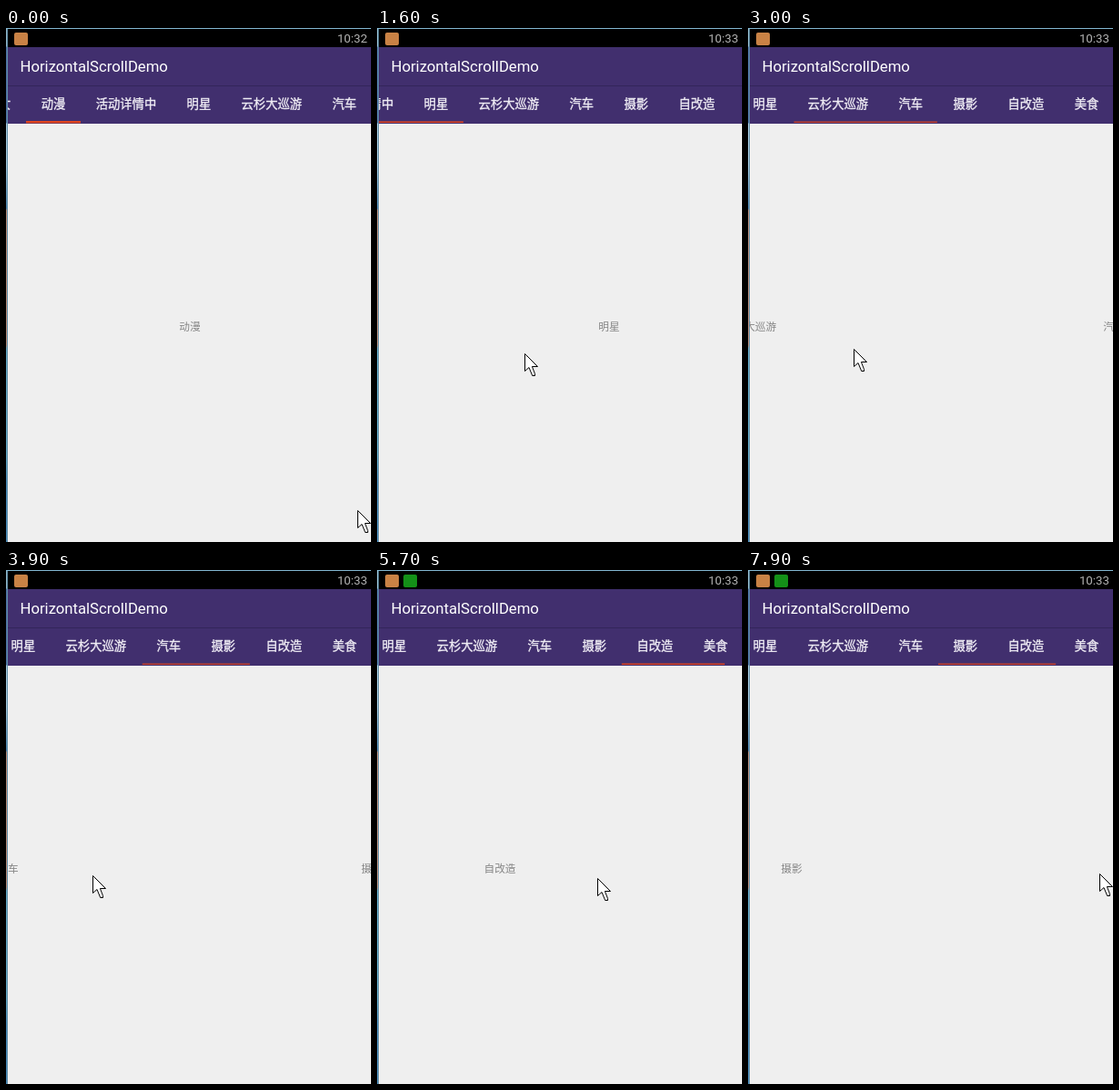
Write an HTML page that moves like this. It is 401 by 564 pixels and loops after 8000 ms.

```html
<!DOCTYPE html>
<html lang="zh-CN">
<head>
<meta charset="utf-8">
<title>HorizontalScrollDemo</title>
<style>
  html, body { margin: 0; width: 100%; height: 100%; overflow: hidden; }
  body { position: relative; background: #efefef; font-family: Roboto, "Noto Sans CJK SC", "Noto Sans CJK", sans-serif; }
  div, span, svg { position: absolute; white-space: nowrap; }
  #edge {
    left: 0; top: 0; width: 1px; height: 100%;
    background: linear-gradient(#8fb4c4 20px, #4a6ca4 21px 104px, #a9cbdf 105px 150px, #4a82b0 198px,
      #b98a78 200px 348px, #66acc8 352px 470px, #4a8abb 500px);
  }
  #rim { left: 1px; top: 0; width: 1px; height: 100%; background: #5f8ca4; }
  #top { left: 0; top: 0; width: 100%; height: 1px; background: #82b6d0; }
  #device { left: 2px; top: 1px; width: 399px; height: 563px; overflow: hidden; background: #efefef; }
  #status { width: 100%; height: 20px; background: #000; }
  .icon { top: 4px; width: 15px; height: 14px; border-radius: 2px; }
  #app { left: 7px; background: #c98245; }
  #game { left: 27px; background: #149018; }
  #clock { right: 4px; top: 0; font-size: 13.3px; line-height: 21px; color: #b4b4b4; }
  #bar { top: 20px; width: 100%; height: 43px; background: #412f6e; box-shadow: inset 0 -1px #33255a; }
  #bar span { left: 13.5px; font-size: 16.7px; line-height: 43px; color: #fff; }
  #tabs { top: 63px; width: 100%; height: 41px; overflow: hidden; background: #412f6e; }
  #strip { left: 0; top: 0; }
  #strip span { top: 0; font-size: 13.3px; line-height: 39.5px; text-align: center; color: #f0edf5; -webkit-text-stroke: .35px #f0edf5; }
  #line { left: 0; top: 0; width: 1px; height: 1px; transform-origin: 0 0; background: #e2461f; }
  .page { top: 317px; width: 400px; text-align: center; font-size: 11.7px; line-height: 20px; color: #858585; }
  #mouse { left: 0; top: 0; }
</style>
</head>
<body>
<div id="edge"></div>
<div id="rim"></div>
<div id="top"></div>
<div id="device">
  <div id="status">
    <div class="icon" id="app"></div>
    <div class="icon" id="game"></div>
    <span id="clock">10:32</span>
  </div>
  <div id="bar"><span>HorizontalScrollDemo</span></div>
  <div id="tabs"><div id="strip"><div id="line"></div></div></div>
</div>
<svg id="mouse" width="17" height="27" viewBox="0 0 17 27">
  <path d="M.5 .5V19.5L5 15.5L8.7 24.5H11.5V22.5L8.4 14.5H14.5Z" fill="#fff" stroke="#000"/>
</svg>
<script>
const LOOP = 8000, STEP = 100, PAGE = 400;
const EM = 13.3, PAD = 16.7, INSET = 20, MAX_SCROLL = 173;
const THICK = 2.4, BASE = 40.4;
const DRAG = 300, SETTLE = 560;
const titles = ["美女", "动漫", "活动详情中", "明星", "云杉大巡游", "汽车", "摄影", "自改造", "美食"];

// Each swipe drags the page partway, lets go at time t with the pointer at x, y, and the page settles.
const swipe = (t, x, y, reach = .5, dir = 1) => ({ t, x, y, reach, dir, from: x + dir * reach * PAGE });
const rest = swipe(0, 386, 529, 0, 0);
const swipes = [
  swipe(700, 125, 363), swipe(1400, 52, 361), swipe(2100, 71, 352),
  swipe(3000, 116, 352), swipe(3900, 95, 335), swipe(4800, 95, 318, .6),
  swipe(5900, 109, 338), swipe(7000, 309, 330, .5, -1), swipe(7900, 386, 333, .615, -1)
];

const $ = id => document.getElementById(id);
const mix = (a, b, k) => a + (b - a) * k;
const unit = k => Math.min(1, Math.max(0, k));
const easeOut = k => 1 - (1 - k) ** 3;
const smooth = k => k * k * (3 - 2 * k);

function add(parent, text, css, cls = "") {
  const el = document.createElement("span");
  el.textContent = text;
  el.className = cls;
  Object.assign(el.style, css);
  return parent.appendChild(el);
}

const width = s => s.length * EM + 2 * PAD;
let end = -width(titles[0]);
const tabs = titles.map(s => {
  const tab = { x: end, w: width(s) };
  end += tab.w;
  add($("strip"), s, { left: tab.x + "px", width: tab.w + "px" });
  return tab;
}).slice(1);
const pages = titles.slice(1).map(s => add($("device"), s, {}, "page"));

const dragged = (s, t) => unit((t - s.t + DRAG) / DRAG);

function pageAt(t) {
  return swipes.reduce((p, s) => {
    const settled = easeOut(unit((t - s.t) / SETTLE));
    return p + s.dir * mix(s.reach * dragged(s, t), 1, settled);
  }, 0);
}

function pointerAt(t) {
  const i = swipes.findIndex(s => s.t >= t);
  const s = swipes[i], last = swipes[i - 1] || rest;
  const k = smooth(unit((t - last.t) / (s.t - DRAG - last.t)));
  return [mix(mix(last.x, s.from, k), s.x, dragged(s, t)), mix(last.y, s.y, k)];
}

function draw(now) {
  const t = Math.floor(now % LOOP / STEP) * STEP;
  const p = pageAt(t), [x, y] = pointerAt(t);
  const i = Math.floor(p + 1e-6), o = Math.max(0, p - i);
  const cur = tabs[i], next = tabs[i + 1] || cur;

  const scroll = Math.min(MAX_SCROLL, cur.x + o * cur.w - INSET);
  $("strip").style.transform = `translateX(${-Math.round(scroll)}px)`;

  // The leading edge hurries, the trailing edge lags, and the line thins as it stretches.
  const lag = o ** 6, lead = 1 - (1 - o) ** 6;
  const left = mix(cur.x, next.x, lag), right = mix(cur.x + cur.w, next.x + next.w, lead);
  const h = THICK / (1 - lag + lead);
  $("line").style.transform =
    `translate(${left}px, ${BASE - (THICK + h) / 2}px) scale(${right - left}, ${h})`;

  pages.forEach((el, n) => {
    el.style.transform = `translateX(${Math.round((n - p) * PAGE)}px)`;
  });
  $("mouse").style.transform = `translate(${Math.round(x)}px, ${Math.round(y)}px)`;
  $("clock").textContent = t < 1500 ? "10:32" : "10:33";
  $("game").style.visibility = t < 5000 ? "hidden" : "visible";
}

let start;
function tick(now) {
  start ??= now;
  draw(Math.max(0, now - start));
  requestAnimationFrame(tick);
}
draw(0);
requestAnimationFrame(tick);
</script>
</body>
</html>
```
